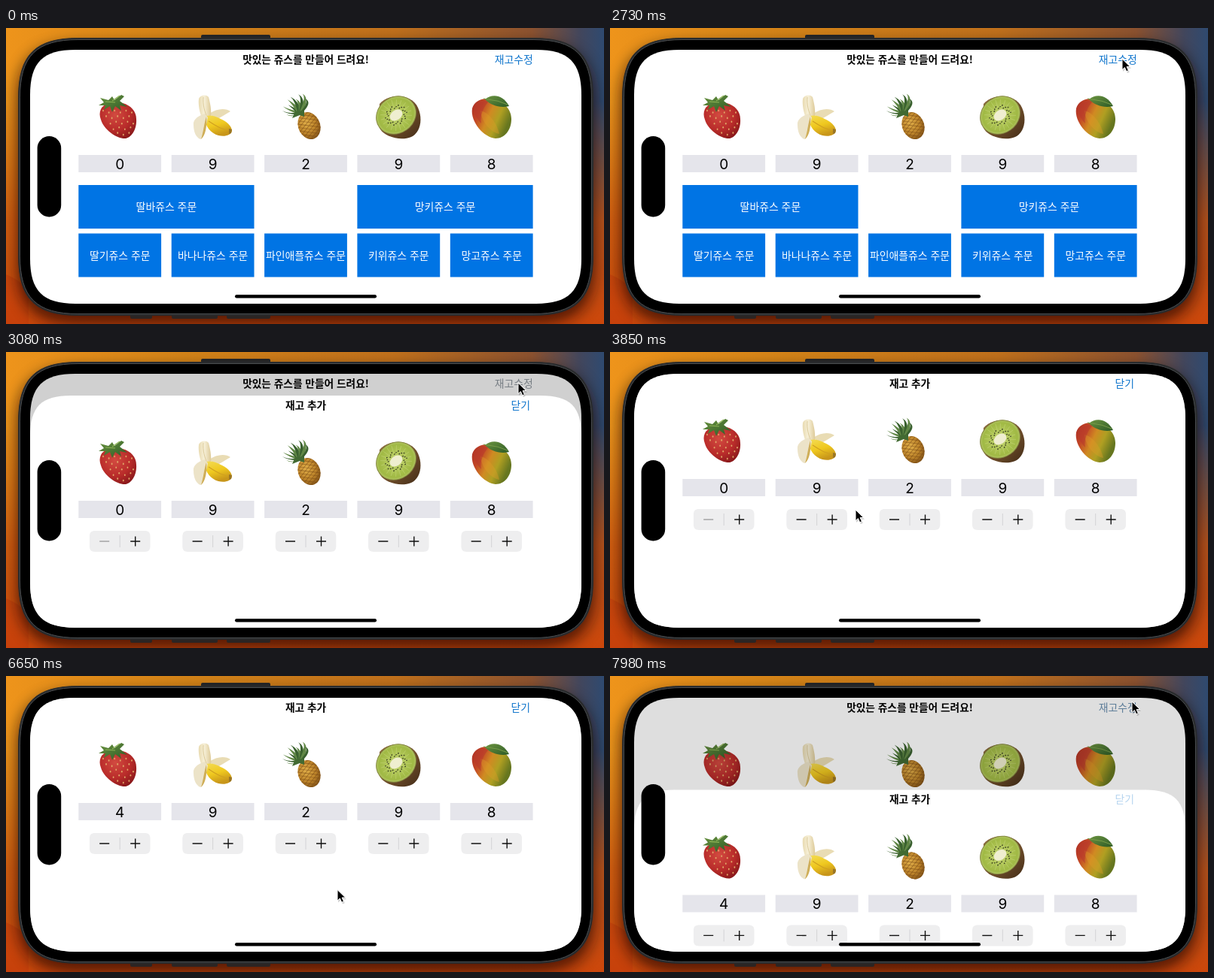
Write an HTML page that moves like this. It is 794 px wide and 394 px high and loops after 8 s.

```html
<!DOCTYPE html>
<html lang="ko">
<head>
<meta charset="utf-8">
<title>쥬스 메이커</title>
<style>
html, body { margin: 0; width: 100%; height: 100%; overflow: hidden; background: #a8500f; }
svg { display: block; width: 794px; height: 394px; }
text { font: 13.9px "Noto Sans CJK KR", "Noto Sans", sans-serif; text-anchor: middle; }
text.title { font-size: 13.7px; font-weight: 600; }
text.num { font: 19px Inter, Roboto, sans-serif; }
</style>
</head>
<body>
<svg id="stage" viewBox="0 0 794 394" xmlns="http://www.w3.org/2000/svg"></svg>
<script>
const LOOP = 8000, STEP = 70;
const BLUE = [14, 116, 204], GRAY = [158, 158, 158];
const COLS = [151.2, 274.6, 398, 521.3, 644.7];
const START = [0, 9, 2, 9, 8];
const stage = document.getElementById('stage');

// Rounded rectangle with continuous corners
function squircle(x, y, w, h, r) {
  const R = r * 1.28, c = R * 0.28, X = x + w, Y = y + h;
  return `M${x} ${y + R}C${x} ${y + c} ${x + c} ${y} ${x + R} ${y}H${X - R}` +
    `C${X - c} ${y} ${X} ${y + c} ${X} ${y + R}V${Y - R}` +
    `C${X} ${Y - c} ${X - c} ${Y} ${X - R} ${Y}H${x + R}` +
    `C${x + c} ${Y} ${x} ${Y - c} ${x} ${Y - R}Z`;
}
const path = (d, fill, more = '') => `<path d="${d}" fill="${fill}" ${more}/>`;
const rect = (x, y, w, h, fill, more = '') =>
  `<rect x="${x}" y="${y}" width="${w}" height="${h}" fill="${fill}" ${more}/>`;
const label = (x, y, s, more = '') => `<text x="${x}" y="${y}" ${more}>${s}</text>`;
const stops = list => list.map(([o, c, a = 1]) =>
  `<stop offset="${o}" stop-color="${c}" stop-opacity="${a}"/>`).join('');
const linear = (id, x2, y2, list) =>
  `<linearGradient id="${id}" x1="0" y1="0" x2="${x2}" y2="${y2}">${stops(list)}</linearGradient>`;
const radial = (id, cx, cy, r, list) =>
  `<radialGradient id="${id}" cx="${cx}" cy="${cy}" r="${r}">${stops(list)}</radialGradient>`;
const repeat = (n, fn) => Array.from({ length: n }, (_, i) => fn(i)).join('');

const defs = '<defs>' +
  linear('sky', 1, 0, [[0, '#ee941b'], [0.3, '#d38318'], [0.65, '#c0701c'], [0.88, '#8c5230'], [0.96, '#42465c'], [1, '#2f4a70']]) +
  linear('glow', 0, 1, [[0, '#d2600f', 0], [0.25, '#d2600f', 0], [0.65, '#d2560f', 0.85], [1, '#cc470b']]) +
  radial('berry', 0.42, 0.35, 0.7, [[0, '#d24a40'], [0.6, '#b92c2a'], [1, '#8a191b']]) +
  linear('peel', 0.4, 1, [[0, '#f3dc55'], [0.55, '#efc81f'], [1, '#c8961a']]) +
  linear('flesh', 1, 0, [[0, '#e8dab0'], [0.45, '#f7f0d8'], [1, '#ddca98']]) +
  radial('pine', 0.42, 0.35, 0.7, [[0, '#e2b04a'], [0.6, '#bd842a'], [1, '#7c4e16']]) +
  linear('skin', 1, 1, [[0, '#8d6a3c'], [0.6, '#6b4a28'], [1, '#422c18']]) +
  radial('kiwi', 0.5, 0.5, 0.55, [[0, '#e4eab0'], [0.35, '#b3c85a'], [0.8, '#a0b944'], [1, '#bccb74']]) +
  linear('mango', 1, 0.45, [[0, '#aa2c26'], [0.28, '#c24626'], [0.52, '#d08a22'], [0.74, '#b09f22'], [1, '#66761f']]) +
  linear('leaf', 1, 1, [[0, '#6c9440'], [1, '#2c5a26']]) +
  '<filter id="blur" x="-10%" y="-20%" width="120%" height="140%"><feGaussianBlur stdDeviation="10"/></filter>' +
  `<clipPath id="screen"><path d="${squircle(32, 29, 732, 338, 47)}"/></clipPath>` +
  `<g id="fruits">${fruits()}</g></defs>`;

function strawberry() {
  const body = 'M126 108C130 100 143 97 155 100C166 103 173 111 173 121C174 133 168 145 159 147C148 148 130 136 126 122C124 117 124 112 126 108Z';
  const seeds = repeat(30, i => {
    const row = Math.floor(i / 6), x = 129 + (i % 6) * 7.6 + (row % 2) * 3 + row, y = 110 + row * 7.4 + (i % 2) * 2.5;
    return x > 170 || x + 3 < 124 + row * 6 ? '' :
      `<ellipse cx="${x}" cy="${y}" rx=".9" ry="1.3" fill="#e0a868"/>`;
  });
  return path(body, 'url(#berry)') + seeds +
    path('M123 103L130 99L125 93L136 96L141 91L144 96L153 89L157 91L151 97L161 105L151 103L153 110L145 104L141 112L138 104L130 109L132 103Z', 'url(#leaf)') +
    path('M141 97L151 90M132 98L145 99', 'none', 'stroke="#8db455" stroke-width="1.2"');
}
function banana() {
  return path('M270 114C279 107 292 106 298 111C292 115 285 118 279 123Z', '#e9dcb4') +
    path('M256 94C258 89 266 88 269 92C271 100 273 108 272 120L261 122C257 113 255 102 256 94Z', 'url(#flesh)') +
    path('M262 92C261 102 264 112 267 119', 'none', 'stroke="#dccb9c" stroke-width="1"') +
    path('M263 119C268 114 278 117 285 121C292 124 300 130 300 137C299 143 290 145 282 143C272 140 265 132 263 119Z', 'url(#peel)') +
    path('M269 124C277 129 286 136 298 136', 'none', 'stroke="#d0a020" stroke-width="1.2"') +
    path('M296 134L300 135L299 140L296 141Z', '#9a7626') +
    path('M264 114C254 117 248 123 249 129C249 139 253 147 259 148C264 143 265 131 268 119Z', '#ece3c8') +
    path('M266 118C263 127 262 139 259 148C265 143 267 131 266 118Z', '#cfae58');
}
function pineapple() {
  const blades = repeat(10, i => {
    const a = (-188 + i * 13) * Math.PI / 180, len = 19 + 7 * Math.sin(i * 2.1) ** 2;
    const x = 391 + Math.cos(a) * len, y = 112 + Math.sin(a) * len;
    return path(`M388 115Q${x + 6} ${y + 5} ${x} ${y}Q${x + 10} ${y + 5} 394 112Z`, i % 2 ? '#3a612f' : '#608745');
  });
  const mesh = repeat(9, i => {
    const k = -20 + i * 5;
    return path(`M-16 ${k - 9}L16 ${k + 9}M-16 ${k + 9}L16 ${k - 9}`, 'none', 'stroke="#7a4a14" stroke-width=".9" opacity=".6"');
  });
  return blades + '<clipPath id="pc"><ellipse rx="14.5" ry="18.5"/></clipPath>' +
    '<g transform="translate(402.5 130) rotate(-22)"><ellipse rx="14.5" ry="18.5" fill="url(#pine)"/>' +
    `<g clip-path="url(#pc)">${mesh}</g></g>` +
    path('M384 111L380 120L390 116L396 118L396 110Z', '#426a32');
}
function kiwi() {
  const ring = repeat(30, i => {
    const a = i * Math.PI / 15, k = 1 + (i % 3) * 0.18;
    return `<ellipse cx="${Math.cos(a) * 11 * k}" cy="${Math.sin(a) * 9 * k}" rx="1" ry=".7" fill="#343820"/>`;
  });
  return path('M496 101C507 87 538 86 547 106C554 122 550 139 538 145C524 151 500 145 495 131Z', 'url(#skin)') +
    '<g transform="translate(518 116) rotate(-35)"><ellipse rx="28" ry="24.5" fill="#84883f"/>' +
    '<ellipse rx="27" ry="23.5" fill="url(#kiwi)"/>' +
    repeat(20, i => `<path d="M9 0H21" stroke="#cddc86" stroke-width=".7" opacity=".6" transform="rotate(${i * 18})"/>`) +
    '<ellipse rx="9" ry="6.5" fill="#efeed0"/>' + ring + '</g>';
}
function mango() {
  return path('M619 107C622 96 635 92 647 95C661 98 671 108 671 121C671 136 662 147 650 147C635 146 616 125 619 107Z', 'url(#mango)') +
    path('M630 110C640 112 652 126 655 141C643 139 631 124 630 110Z', '#dc9c28', 'opacity=".4"') +
    path('M622 108C626 98 636 95 642 97C634 104 629 116 631 127C624 120 621 113 622 108Z', '#b83a2c', 'opacity=".6"') +
    path('M636 95C644 88 659 87 668 104C656 107 644 103 636 95Z', 'url(#leaf)') +
    path('M634 94L640 95Q653 96 666 102', 'none', 'stroke="#799c49" stroke-width="1"');
}
function fruits() { return strawberry() + banana() + pineapple() + kiwi() + mango(); }

const counters = cls => COLS.map((x, i) => rect(x - 54.9, 169, 109.8, 23, '#e5e5eb') +
  label(x, 187.8, START[i], `class="num ${cls}"`)).join('');
const button = (x, y, w, s) => rect(x, y, w, 58, '#0074e4') + label(x + w / 2, y + 34, s, 'fill="#fff"');
const names = ['딸기', '바나나', '파인애플', '키위', '망고'];

const stepper = (x, i) => `<path d="${squircle(x - 40.3, 209, 80.6, 28, 6)}" fill="#eeeeef"/>` +
  (i ? '' : path(`M${x} 209H185Q191.5 209 191.5 215.5V230.5Q191.5 237 185 237H${x}Z`, '#d4d4d7', 'id="press" opacity="0"')) +
  path(`M${x} 215V231`, 'none', 'stroke="#d3d3d6"') +
  path(`M${x - 27} 223H${x - 14}`, 'none', `stroke="#111" stroke-width="1.4" ${i ? '' : 'id="minus"'}`) +
  path(`M${x + 14} 223H${x + 27}M${x + 20.5} 216.5V229.5`, 'none', 'stroke="#111" stroke-width="1.4"');

stage.innerHTML = defs +
  rect(0, 0, 794, 394, 'url(#sky)') + rect(0, 0, 794, 394, 'url(#glow)') +
  path('M0 328Q14 333 30 348V394H0Z', '#c43c0c', 'opacity=".55"') +
  `<path d="${squircle(14, 22, 768, 372, 64)}" fill="#140400" opacity=".68" filter="url(#blur)"/>` +
  rect(259, 9, 92, 8, '#232426', 'rx="2"') +
  [[165, 29], [220, 61], [293, 58]].map(([x, w]) => rect(x, 379, w, 8, '#2c2523', 'rx="2"')).join('') +
  `<path d="${squircle(16.5, 13.5, 763, 369, 62)}" fill="#26282a" stroke="#2b2d2f"/>` +
  `<path d="${squircle(18.5, 15.5, 759, 365, 60.5)}" fill="#000" stroke="#4c4f52"/>` +
  '<g clip-path="url(#screen)">' + rect(32, 29, 732, 338, '#fff') +
  label(398, 46.6, '맛있는 쥬스를 만들어 드려요!', 'class="title"') +
  label(674.3, 46.6, '재고수정', 'id="edit"') + '<use href="#fruits"/>' + counters('main') +
  button(96.3, 209, 233.2, '딸바쥬스 주문') + button(466.4, 209, 233.2, '망키쥬스 주문') +
  COLS.map((x, i) => button(x - 54.9, 273.5, 109.8, names[i] + '쥬스 주문')).join('') +
  rect(32, 29, 732, 338, '#000', 'id="dim" opacity="0"') +
  `<g id="sheet"><path d="${squircle(32, 29, 732, 460, 42)}" fill="#fff"/>` +
  label(398, 46.6, '재고 추가', 'class="title"') + label(683.3, 46.6, '닫기', `id="close" fill="rgb(${BLUE})"`) +
  '<use href="#fruits"/>' + counters('stock') + COLS.map(stepper).join('') + '</g>' +
  rect(304, 355, 188, 4.4, '#000', 'rx="2.2"') + '</g>' +
  rect(41.6, 144, 31.6, 107.5, '#000', 'rx="15.8"') +
  '<g id="cursor">' + path('M1 2V17L4.6 13.8L7 19L9.8 17.8L7.5 12.8H12Z', '#000', 'opacity=".18"') +
  path('M0 0V14.6L3.4 11.5L5.7 16.8L8.4 15.6L6.1 10.5H10.7Z', '#000', 'stroke="#fff" stroke-width="1" stroke-linejoin="round"') + '</g>';

const [edit, dim, sheet, closeBtn, press, minus, cursor] =
  ['edit', 'dim', 'sheet', 'close', 'press', 'minus', 'cursor'].map(id => document.getElementById(id));
const stock = document.querySelector('.stock');

// Pointer route: time, x, y
const ROUTE = [
  [700, 773, 373], [1050, 640, 300], [1470, 478, 221], [1540, 478, 229], [1890, 478, 229],
  [2240, 600, 118], [2590, 680, 41], [3360, 680, 41], [3500, 645, 84], [3850, 326, 210],
  [4270, 177, 219.5], [5600, 177, 219.5], [5950, 430, 110], [6230, 688, 16], [6440, 540, 165],
  [6650, 440, 284.5], [6860, 409, 347], [7070, 540, 220], [7280, 680, 68], [7350, 702, 39],
  [7490, 702, 39], [7770, 693, 34], [8000, 693, 34]
];
function slope(i, k) {
  const p = ROUTE[i - 1], q = ROUTE[i], n = ROUTE[i + 1];
  if (!p || !n) return 0;
  const a = (q[k] - p[k]) / (q[0] - p[0]), b = (n[k] - q[k]) / (n[0] - q[0]);
  return a * b <= 0 ? 0 : 2 * a * b / (a + b);
}
function pointer(t) {
  let i = 0;
  while (i < ROUTE.length - 2 && t >= ROUTE[i + 1][0]) i++;
  const a = ROUTE[i], b = ROUTE[i + 1], d = b[0] - a[0], u = (t - a[0]) / d, v = 1 - u;
  return [1, 2].map(k => a[k] * v * v * (1 + 2 * u) + b[k] * u * u * (3 - 2 * u) +
    d * u * v * (slope(i, k) * v - slope(i + 1, k) * u));
}

const clamp = x => Math.max(0, Math.min(1, x));
const spring = ms => {
  const x = Math.max(0, ms) * 0.01826;
  return 1 - (1 + x) * Math.exp(-x);
};
const OPEN = 2856.5, CLOSE = 7910.5;
const TAPS = [4410, 4620, 4830, 5180];

function draw(t) {
  const open = spring(t - OPEN) - spring(t - CLOSE);
  sheet.setAttribute('transform', `translate(0 ${(1 - open) * 338})`);
  sheet.setAttribute('visibility', t < OPEN ? 'hidden' : 'visible');
  dim.setAttribute('opacity', 0.2 * open);
  edit.setAttribute('fill', `rgb(${BLUE.map((c, i) => Math.round(c + (GRAY[i] - c) * open))})`);
  edit.setAttribute('opacity', 1 - 0.7 * clamp((t - 2750) / 60) * clamp((3060 - t) / 200));
  closeBtn.setAttribute('opacity', 1 - 0.7 * clamp((t - 7650) / 100));

  const taps = TAPS.filter(s => t >= s), last = taps[taps.length - 1];
  stock.textContent = taps.length;
  minus.setAttribute('stroke', taps.length ? '#111' : '#a3a3a5');
  press.setAttribute('opacity', last ? clamp((last + 200 - t) / 110) : 0);

  const [x, y] = pointer(t);
  cursor.setAttribute('visibility', t < 700 ? 'hidden' : 'visible');
  cursor.setAttribute('transform', `translate(${x} ${y})`);
}

function tick() {
  const t = performance.now() % LOOP;
  draw(Math.floor(t / STEP) * STEP);
  requestAnimationFrame(tick);
}
tick();
</script>
</body>
</html>
```
